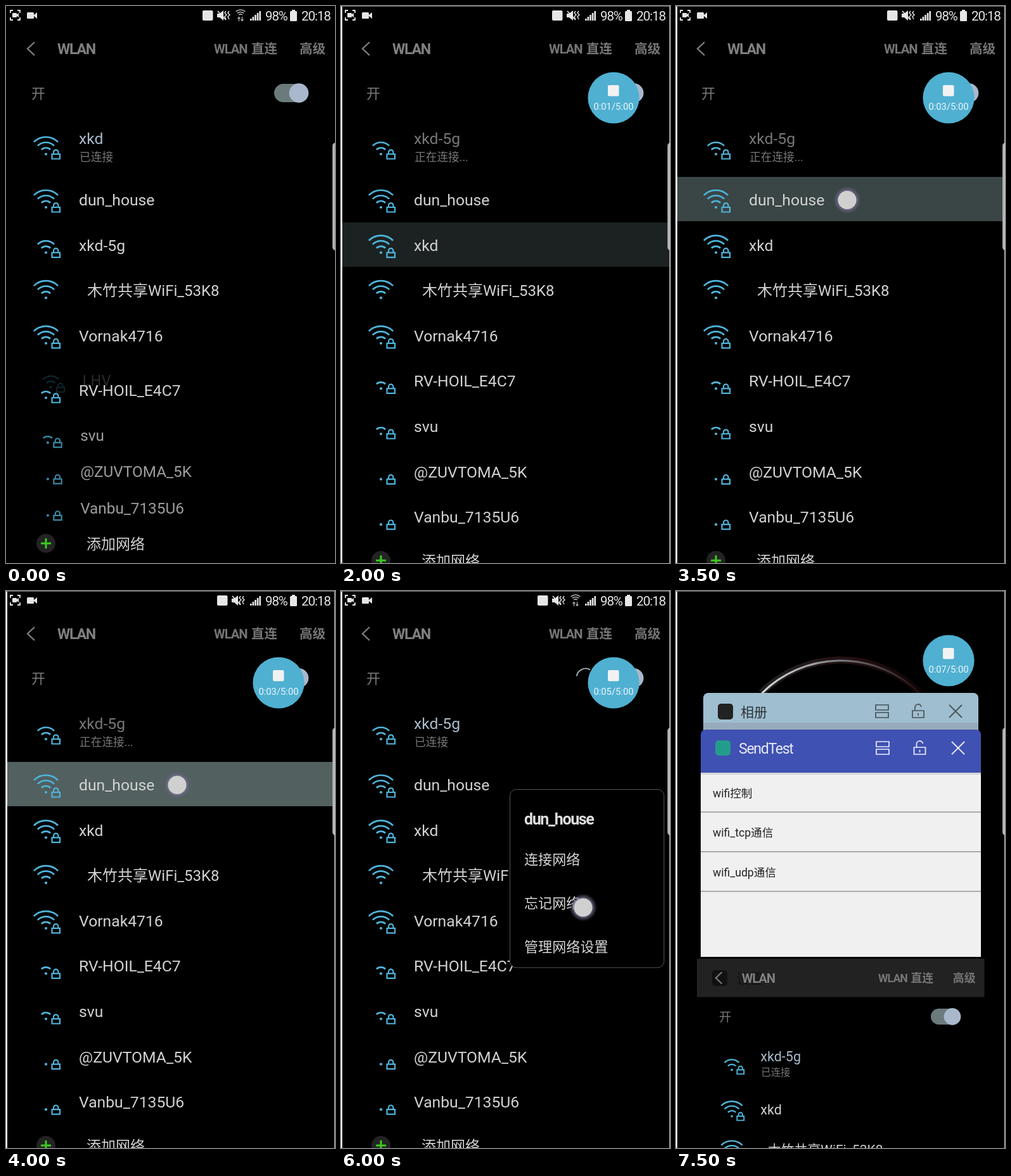
An HTML page for the animation above (8 s loop, 519 by 880 pixels).

```html
<!DOCTYPE html>
<html lang="zh-CN">
<head>
<meta charset="utf-8">
<style>
html, body { margin: 0; width: 100%; height: 100%; overflow: hidden; background: #000; }
svg { display: block; width: 519px; height: 880px; font-family: Roboto, "Noto Sans CJK SC", "Noto Sans CJK", sans-serif; }
.tight { letter-spacing: -.055em; }
.bold { font-weight: 700; }
</style>
</head>
<body>
<svg id="stage" viewBox="0 0 519 880"></svg>
<script>
const STEP = 500, STEPS = 16;
const BLUE = '#4fb4da';

// Networks: name and signal level (number of arcs); the open one has no lock.
const nets = [
  ['xkd', 3], ['dun_house', 3], ['xkd-5g', 2], ['木竹共享WiFi_53K8', 3, 'open'], ['Vornak4716', 3],
  ['RV-HOIL_E4C7', 1], ['svu', 1], ['@ZUVTOMA_5K', 0], ['Vanbu_7135U6', 0], ['LHV', 2]
];
const rowY = i => i ? 306 + 71.6 * (i - 1) : 209;

// y is the vertical middle of the glyphs
function text(x, y, size, fill, str, extra = '') {
  const rise = /[\u4e00-\u9fff]/.test(str) ? .385 : .36;
  return `<text x="${x}" y="${y + size * rise}" font-size="${size}" fill="${fill}" ${extra}>${str}</text>`;
}
const rect = (x, y, w, h, fill, rx = 0, extra = '') =>
  `<rect x="${x}" y="${y}" width="${w}" height="${h}" fill="${fill}" rx="${rx}" ${extra}/>`;
const circle = (x, y, r, fill) => `<circle cx="${x}" cy="${y}" r="${r}" fill="${fill}"/>`;
const line = (d, color, width = 2) => `<path d="${d}" fill="none" stroke="${color}" stroke-width="${width}"/>`;
const group = (transform, body, opacity = 1) => `<g transform="${transform}" opacity="${opacity}">${body}</g>`;

function arc(cx, cy, r, from, to) {
  const point = deg => {
    const a = deg * Math.PI / 180;
    return `${cx + r * Math.cos(a)} ${cy + r * Math.sin(a)}`;
  };
  return `M${point(from)}A${r} ${r} 0 ${to - from > 180 ? 1 : 0} 1 ${point(to)}`;
}

function wifi(level, open) {
  const arcs = [10, 18.5, 27].slice(0, level).map(r => arc(63, 12, r, 225, 315)).join('');
  const lock = open ? '' : line('M72.5 12h12.5v7.5h-12.5zM75 12v-3a3.7 3.7 0 0 1 7.4 0v3', BLUE, 2.2);
  return line(arcs, BLUE, 2.7) + circle(63, 12, 2.1, BLUE) + lock;
}

function row(id, y, { scale = 1, opacity = 1, fill = '#d2d2d2', iconDy = 0 } = {}) {
  const [name, level, open] = nets[id];
  return group(`translate(260 ${y}) scale(${scale}) translate(-260 0)`,
    group(`translate(0 ${iconDy})`, wifi(level, open)) +
    text(open ? 128 : 115, 0, open ? 24 : 24.7, fill, name), opacity);
}

const addRow = y => circle(63, y, 15, '#232323') + line(`M55 ${y}h16M63 ${y - 8}v16`, '#3ccb20', 3) +
  text(127, y, 23, '#d2d2d2', '添加网络');

const header = () => line('M45 57L34 67.5L45 78', '#7c7c7c', 2.4) +
  text(81, 68, 23.2, '#808080', 'WLAN', 'class="bold tight"') +
  text(328, 68, 20.3, '#757575', 'WLAN', 'class="bold tight"') +
  text(387, 67, 20.4, '#757575', '直连', 'class="bold"') +
  text(463, 67, 20.6, '#757575', '高级', 'class="bold"');

const toggle = () => rect(423, 123, 50, 29, '#6b7b7b', 14.5) + circle(462, 137.5, 15.3, '#a9b8cc');

function firstRow(id, status) {
  const fill = status === '正在连接...' ? '#777' : '#a9bccb';
  return row(id, 209, { fill, iconDy: 13 }) + text(116, 238, 17.7, '#777', status);
}

function list(order, status) {
  const [first, ...rest] = order;
  return text(40, 138, 22, '#777', '开') + toggle() + firstRow(first, status) +
    rest.map((id, i) => row(id, rowY(i + 1))).join('') + addRow(876);
}

// The list while one network is dropping out
const closingList = () => text(40, 138, 22, '#777', '开') + toggle() + firstRow(0, '已连接') +
  [1, 2, 3, 4].map(id => row(id, rowY(id))).join('') +
  row(9, 591, { scale: .96, opacity: .2 }) + row(5, 607) +
  [6, 7, 8].map(id => row(id, 678 + 57.5 * (id - 6), { scale: .985, opacity: .75 })).join('') +
  addRow(849);

function statusBar(net) {
  const white = '#e6e6e6', shift = net ? 0 : 23;
  const bars = [0, 1, 2, 3, 4].map(i => rect(385 + i * 3.6, 20 - i * 3, 2.6, 3 + i * 3, white)).join('');
  let signal = '';
  if (net) {
    const arcs = [4, 7.5, 11].map(r => arc(370, 17, r, 228, 312)).join('');
    signal = line(arcs, '#aaa', 1.7) + (net === 'check'
      ? circle(374, 18, 4.5, white) + line('M374 15v3.5M374 19.5v1.5', '#000', 1.4)
      : line('M367.5 24v-6M365.5 20l2-2.5l2 2.5M372.5 17v6M370.5 21l2 2.5l2-2.5', '#aaa', 1.3));
  }
  return line('M7 11V7h4M18 7h4v4M22 18v4h-4M11 22H7v-4', white, 1.8) +
    rect(10, 11, 7, 7, white, 1) + `<path d="M16 14l4-3v7l-4-3z" fill="${white}"/>` +
    rect(33, 10, 11, 10, white, 1.5) + `<path d="M43 15l6-5v10z" fill="${white}"/>` +
    group(`translate(${shift} 0)`, rect(310, 7, 16.5, 16, white, 2) +
      `<path d="M333 12h4l6-5v16l-6-5h-4z" fill="${white}"/>` +
      line('M334 8l13 14', white, 1.8) + line('M347 8l-2 3l3 3l-3 3l2 4M352 8l-2 3l3 3l-3 3l2 4', white, 1.4)) +
    signal + bars + text(409, 15.5, 20.5, white, '98%', 'class="tight"') +
    rect(448, 8, 11, 16, white, 1.5) + rect(451, 6, 5, 3, white) +
    text(466, 15.5, 20.7, white, '20:18', 'class="tight"');
}

const bubble = (y, seconds) => circle(430, y, 40.6, '#4fb0d2') + rect(421, y - 20, 17.5, 17.5, '#f2f2f2', 2) +
  text(430, y + 13.5, 14.8, '#eef6fa', `0:0${seconds}/5:00`, 'text-anchor="middle"');

const touch = (x, y) => circle(x, y, 22, 'url(#glow)') + circle(x, y, 14.5, '#d0d0d0');

const dialog = opacity => rect(266.5, 313.5, 243, 281.5, '#000', 10, 'stroke="#555"') +
  group('', text(289, 360, 25, '#dedede', nets[1][0], 'class="bold tight"') +
    ['连接网络', '忘记网络', '管理网络设置'].map((s, i) => text(289, 423 + i * 69, 22.1, '#d4d4d4', s)).join(''), opacity);

const spinners = {
  10: [[80, 315]], 11: [[150, 350]], 12: [[190, 300]], 13: [[100, 230]], 14: [[118, 164], [297, 303]]
};
const spinner = step => (spinners[step] || []).map(([a, b]) => line(arc(386, 137, 14.5, a, b), '#a5b5ba', 1.8)).join('');

// Split, lock and close buttons of a card
const cardTools = (x, y, gap, color) =>
  line(`M${x} ${y - 10}h20v8h-20zM${x} ${y + 2}h20v8h-20z`, color, 1.7) +
  line(`M${x + gap} ${y - 1}h18v11h-18zM${x + gap + 4} ${y - 1}v-4a5 5 0 0 1 10 -2M${x + gap + 9} ${y + 3}v4`, color, 1.7) +
  line(`M${x + 2 * gap} ${y - 10}l20 20m0 -20l-20 20`, color, 1.8);

function recents() {
  const items = ['wifi控制', 'wifi_tcp通信', 'wifi_udp通信'];
  return line(arc(260, 286, 177, 225, 315), 'url(#haze)', 11) + line(arc(260, 286, 176, 225, 315), 'url(#rim)', 3) +
    rect(43, 161, 434, 70, '#9fbecf', 8) + rect(43, 208, 434, 12, '#98abbd') +
    rect(66, 178, 24, 25, '#222', 5) + text(102, 191, 21, '#2d3338', '相册') + cardTools(315, 190, 58, '#46535a') +
    rect(39, 219, 442, 80, '#3f51b2', 8) + rect(39, 287, 442, 291, '#f0f0f0') + rect(39, 287, 442, 3, '#d3d3d8') +
    rect(62, 236, 24, 24, '#249c8c', 5) + text(99, 249, 23, '#e8eaf6', 'SendTest', 'class="tight"') +
    cardTools(316, 248, 59.5, '#eef') +
    items.map((s, i) => text(58, 319 + i * 62.6, 17.6, '#222', s) + rect(39, 348.5 + i * 62.6, 442, 1.6, '#999')).join('') +
    rect(33, 581, 453.5, 60.5, '#222') + rect(57, 599, 24, 25, '#111', 5) + text(95, 612, 21, '#111', '设置') +
    group('translate(33.1 552.5) scale(.872)', header() + list([2, 0, 3, 1], '已连接'));
}

function frameEdges(step) {
  return rect(515, 216, 9, 170, '#b0b0b0', 5) +
    (step >= 1 ? rect(0, 0, 2, 880, '#fff') + rect(0, 0, 519, 1, '#777') : '') +
    (step >= 2 ? rect(518, 0, 1, 880, '#ccc') : '');
}

function wlanPage(step) {
  const connecting = step >= 4 && step < 10;
  const order = step < 4 ? [0, 1, 2, 3, 4, 5, 6, 7, 8]
    : step < 13 ? [2, 1, 0, 3, 4, 5, 6, 7, 8] : [2, 0, 3, 1, 4, 5, 6, 7, 8];
  const status = connecting ? '正在连接...' : step === 10 || step === 11 ? '正在检查您的互联网连接的质量...' : '已连接';
  const net = connecting ? '' : step === 10 ? 'check' : 'data';
  const pressed = { 4: [342, '#1c2222'], 7: [270, '#3a4545'], 8: [270, '#526060'] }[step];
  return (pressed ? rect(2, pressed[0], 516, 70, pressed[1]) : '') +
    statusBar(net) + header() + (step ? list(order, status) : closingList()) + spinner(step) +
    (step === 7 || step === 8 ? touch(270, 306.5) : '') +
    (step >= 9 && step < 13 ? dialog(step === 9 ? .7 : 1) : '') +
    (step === 12 ? touch(382, 500) : '');
}

const defs = `<defs>
  <radialGradient id="glow"><stop offset=".6" stop-color="#777790"/><stop offset="1" stop-color="#605878" stop-opacity="0"/></radialGradient>
  <linearGradient id="rim"><stop stop-color="#ddd"/><stop offset=".5" stop-color="#777b80"/><stop offset="1" stop-color="#1c0c0c"/></linearGradient>
  <linearGradient id="haze"><stop stop-color="#222"/><stop offset=".6" stop-color="#241010"/><stop offset="1" stop-color="#100404"/></linearGradient>
</defs>`;

const stage = document.getElementById('stage');
let shown = -1;

function draw(now) {
  const step = Math.floor(now / STEP) % STEPS;
  if (step !== shown) {
    shown = step;
    const last = step === STEPS - 1;
    stage.innerHTML = defs + (last ? recents() : wlanPage(step)) +
      (step ? bubble(last ? 110 : 145, Math.floor((step - 1) / 2)) : '') + frameEdges(step);
  }
  requestAnimationFrame(draw);
}
draw(0);
</script>
</body>
</html>
```
